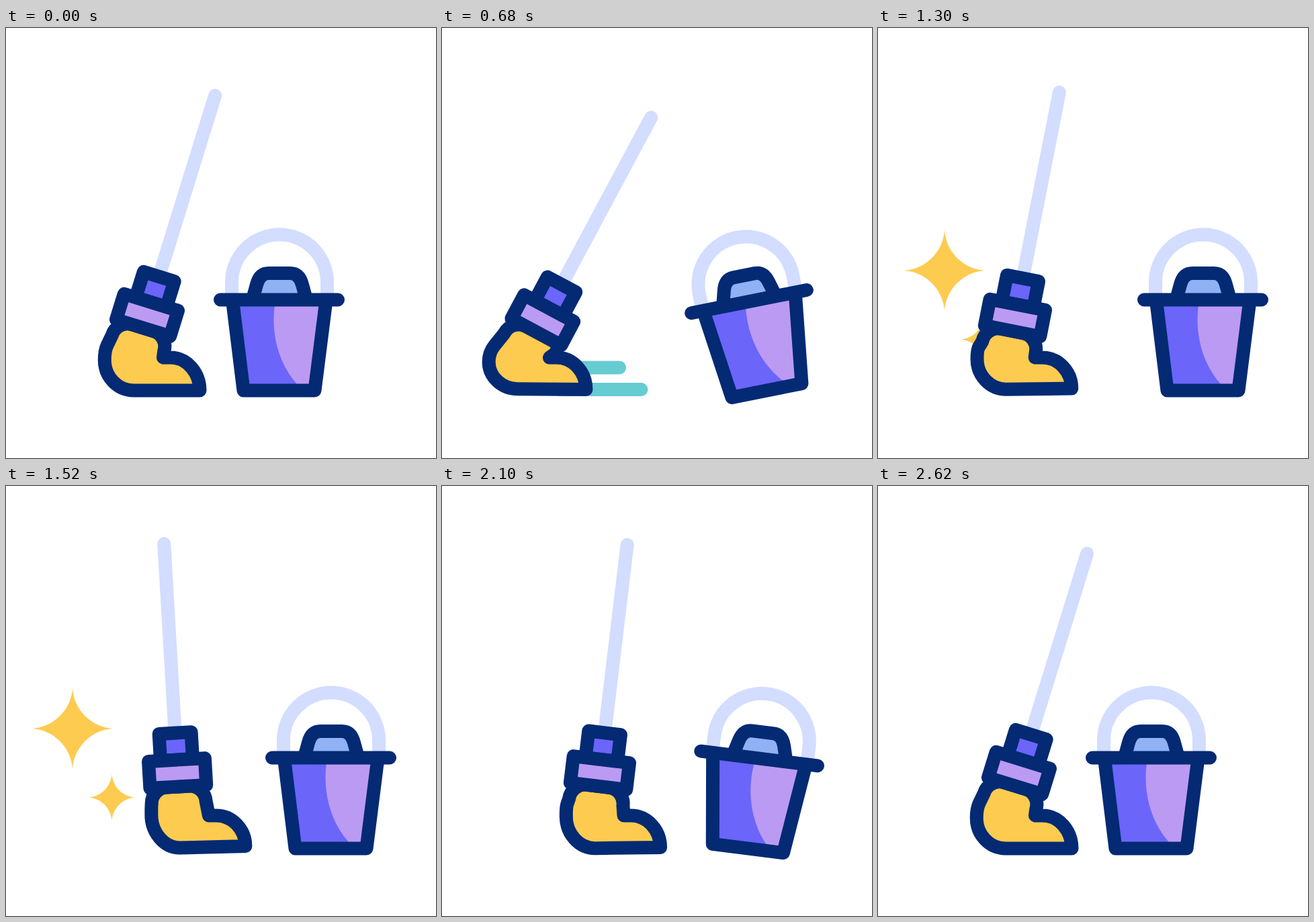
An HTML page that plays this animation: 640x640 px, repeating every 3000 ms.

```html
<!DOCTYPE html>
<html lang="en">
<head>
<meta charset="utf-8">
<title>Mop and bucket</title>
<style>
  html, body { margin: 0; height: 100%; overflow: hidden; background: #fff; }
  svg { display: block; width: 100vw; height: 100vh; }
  .line { fill: none; stroke: #032a73; stroke-width: 20; stroke-linecap: round; stroke-linejoin: round; }
  .pale { stroke: #d2ddff; }
  .water { stroke: #66ccd1; }
  .indigo { fill: #6b65fa; }
  .lilac { fill: #bb9af3; }
  .blue { fill: #91b1f5; }
  .yellow { fill: #fdcb50; }
</style>
</head>
<body>
<svg viewBox="0 0 640 640">
  <defs>
    <path id="star" class="yellow" d="M0 -60C2 -28 28 -2 60 0C28 2 2 28 0 60C-2 28 -28 2 -60 0C-28 -2 -2 -28 0 -60Z"/>
  </defs>
  <use id="bigStar" href="#star"/>
  <use id="smallStar" href="#star"/>
  <path id="trail" class="line water"/>
  <g id="bucket">
    <path class="line pale" d="M336 404V378.5A71 71 0 0 1 478 378.5V404"/>
    <path class="line blue" d="M367 404L373 382Q377.5 365 391 365H423Q436.5 365 441 382L447 404"/>
    <path class="indigo" d="M337 405H476.5L459.5 539.5H353.5Z"/>
    <path class="lilac" d="M400 412C394 455 406 500 433 530H459L476 405H401Z"/>
    <path class="line" d="M337 405L353.5 539.5H459.5L476.5 405M319 404.5H494"/>
  </g>
  <path id="head" class="line yellow"/>
  <g id="shaft">
    <path class="line pale" d="M0 -342V-60"/>
    <path class="line indigo" d="M-24 -60H24V-20H-24Z"/>
    <path class="line lilac" d="M-42 -20H42V20H-42Z"/>
  </g>
</svg>
<script>
const LOOP = 3000;
const el = id => document.getElementById(id);
const place = (id, transform) => el(id).setAttribute('transform', transform);
const mix = (a, b, k) => a.map((v, i) => v + (b[i] - v) * k);

// Eased 0 to 1 between two times
const ramp = (t, from, to) => {
  const u = Math.min(1, Math.max(0, (t - from) / (to - from)));
  return (1 - Math.cos(Math.PI * u)) / 2;
};
// Out to a peak and back
const swing = (t, from, peak, to) => ramp(t, from, peak) - ramp(t, peak, to);
// Pops in at one time and out at another
const pop = (t, on, off) => ramp(t, on, on + 110) - ramp(t, off, off + 110);

// Collar x, y, lean in degrees; toe x, y; sole y
const rest = [210, 427.3, 17.2, 288.5, 539.5, 539.5];
const left = [132, 436.9, 31.4, 192.5, 537.5, 536.5];
const right = [268.5, 426.5, -7.1, 374.2, 535.8, 538.8];

function mopPose(t) {
  const pushed = mix(rest, left, ramp(t, 220, 895));
  const pulled = mix(pushed, right, ramp(t, 895, 1680));
  return mix(pulled, rest, ramp(t, 1740, 2400));
}

const curve = (from, corner, to) => `C${mix(from, corner, .55)} ${mix(to, corner, .55)} ${to}`;

function drawMop([cx, cy, lean, toeX, toeY, soleY]) {
  const rad = lean * Math.PI / 180, c = Math.cos(rad), s = Math.sin(rad);
  const at = (x, y) => [cx + x * c - y * s, cy + x * s + y * c];
  const squash = Math.max(0, lean - 17) / 14;
  const shoulder = at(-41, 44), top = at(-17, 20);
  const end = at(16 + 22 * squash, 20), side = at(40, 44 - 12 * squash);
  const toe = [toeX, toeY], notchY = 490.5;
  const heel = [toeX - 140 - .006 * lean * lean, 490 + .25 * lean];
  const sole = [heel[0] + 43, soleY];
  const bend = [heel[0], heel[1] - 14];

  place('shaft', `translate(${cx} ${cy}) rotate(${lean})`);
  el('head').setAttribute('d',
    `M${shoulder}` + curve(shoulder, at(-41, 20), top) +
    `L${end}` + curve(end, at(40, 20), side) +
    `L${toeX - 54.5} ${notchY}h11` + curve([toeX - 43.5, notchY], [toeX, notchY], toe) +
    `L${sole}` + curve(sole, [heel[0], soleY], heel) +
    `Q${bend} ${mix(bend, shoulder, .35)}Z`);
}

function drawTrail(toeX, length) {
  const start = toeX - 40;
  const streak = (end, y) => `M${start} ${y}H${start + (end - start) * length}`;
  el('trail').setAttribute('d', length > 0 ? streak(264, 505.5) + streak(296.5, 538) : '');
}

function draw() {
  const t = performance.now() % LOOP;
  const pose = mopPose(t);
  drawMop(pose);
  drawTrail(pose[3], ramp(t, 380, 640) - ramp(t, 700, 940));

  place('bigStar', `translate(99 361) scale(${pop(t, 1038, 1780)})`);
  place('smallStar', `translate(157.5 463.5) scale(${.58 * pop(t, 1150, 1890)})`);

  const slide = 77 * (ramp(t, 250, 680) - ramp(t, 1890, 2400));
  const tilt = -13.4 * swing(t, 220, 600, 970) + 5.3 * swing(t, 600, 970, 1300) + 8.6 * swing(t, 1780, 2220, 2620);
  place('bucket', `translate(${slide}) rotate(${tilt} 406.5 540)`);
  requestAnimationFrame(draw);
}
draw();
</script>
</body>
</html>
```
